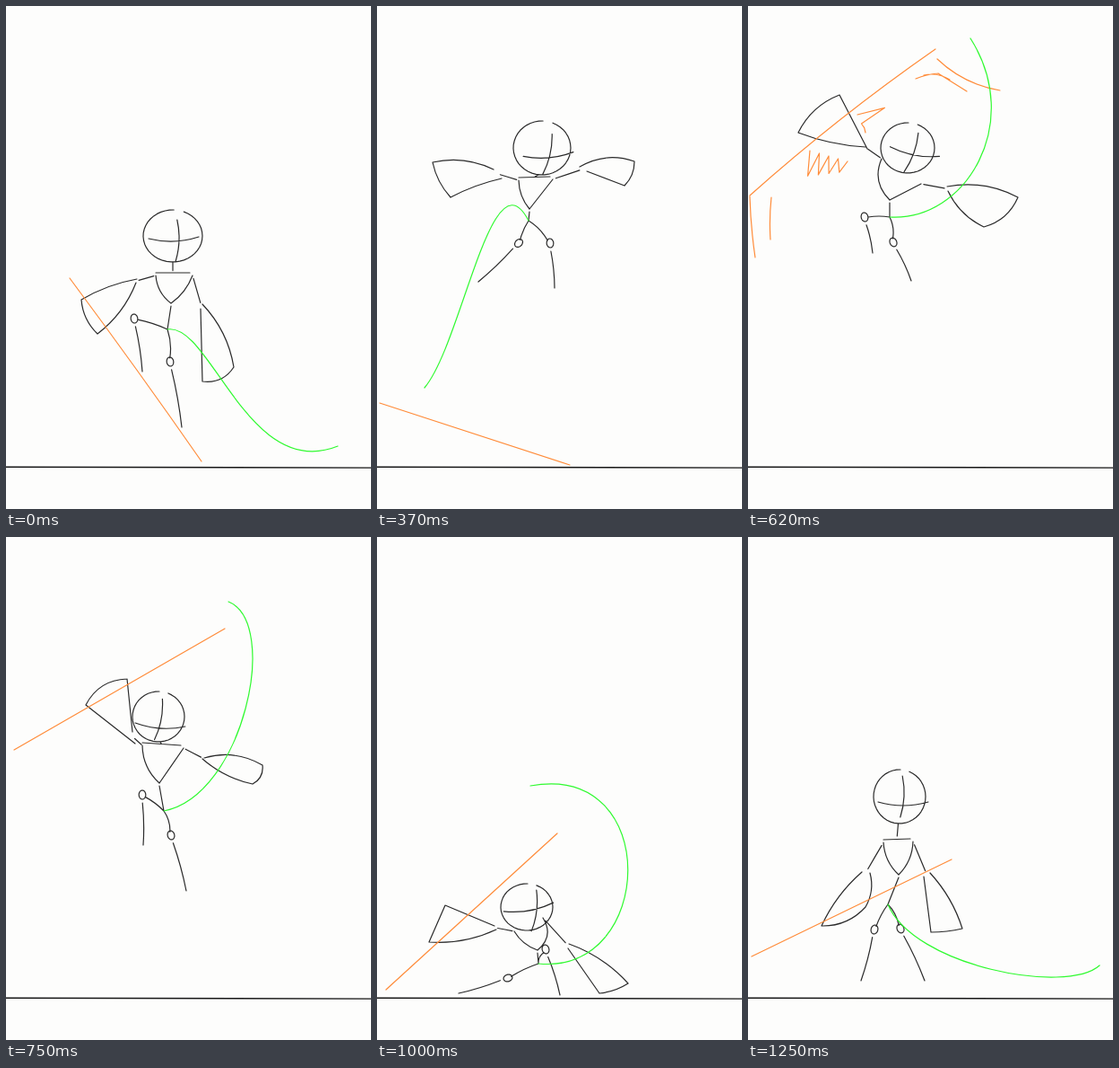
An HTML page for the animation above (1500 ms loop, 407x560 px).

```html
<!DOCTYPE html>
<html lang="en">
<head>
<meta charset="utf-8">
<title>Staff leap</title>
<style>
  html, body { margin: 0; width: 100%; height: 100%; overflow: hidden; background: #fdfdfc; }
  svg { display: block; width: 100vw; height: 100vh; }
  path { fill: none; stroke-width: 1.2; stroke-linecap: round; stroke-linejoin: round; }
  #body { stroke: #2a2a2a; }
  #staff { stroke: #ff8c3a; }
  #tail { stroke: #30fa30; }
  #ground { stroke: #161616; stroke-width: 1.4; }
</style>
</head>
<body>
<svg viewBox="0 0 407 560">
  <path id="ground" d="M0 513.2L407 514.1"/>
  <path id="body"/>
  <path id="staff"/>
  <path id="tail"/>
</svg>
<script>
// head: centre, radii. face: eye line offset and angle, nose line offset and angle.
// chest: left shoulder, right shoulder, base, bend of each side.
// arms: upper and lower start of the sleeve, two cuff corners, three bends.
// legs: left knee, left foot, right knee, right foot.
// staff: ends and bend. tail: Bezier handles and tip, seen from the hip.
const ready = {
  head: [186, 256, 33, 29], face: [1, 2, -2, 4, 5, 92],
  chest: [167, 300, 208, 300, 184, 331, 4, 3], hip: [180, 360],
  armL: [146, 304, 145, 308, 84, 327, 102, 365, -3, 5, -4],
  armR: [219, 332, 217, 337, 254, 402, 219, 418, 6, 0, 6],
  legs: [143, 348, 152, 407, 183, 396, 196, 469],
  staff: [71, 303, 218, 507, 1], tail: [48, -8, 90, 170, 190, 130]
};
const crouch = {
  head: [188, 283, 31, 29], face: [0, 7, -2, 11, 2, 92],
  chest: [165, 310, 198, 308, 184, 344, 7, 5], hip: [183, 361],
  armL: [124, 317, 133, 322, 82, 372, 117, 404, -5, 5, -2],
  armR: [232, 313, 237, 330, 318, 310, 313, 351, 0, 0, 6],
  legs: [143, 357, 136, 413, 187, 401, 180, 459],
  staff: [58, 333, 224, 517, 0], tail: [79, -46, 97, 149, 150, 147]
};
const leap = {
  head: [184, 158, 32, 30], face: [7, 7, -5, 6, 7, 103],
  chest: [158, 194, 196, 193, 170, 226, 3, 0], hip: [169, 239],
  armL: [130, 182, 139, 192, 62, 174, 82, 213, -6, -2, -3],
  armR: [226, 179, 234, 184, 287, 173, 276, 200, 7, 0, 3],
  legs: [158, 264, 113, 307, 193, 264, 198, 314],
  staff: [3, 442, 215, 511, 0], tail: [-41, -79, -74, 136, -116, 186]
};
const strike = {
  head: [178, 158, 30, 28], face: [8, 4, 11, 4, 5, 110],
  chest: [149, 170, 193, 198, 158, 216, 8, 0], hip: [158, 235],
  armL: [133, 159, 131, 157, 102, 99, 56, 141, 0, 3, -6],
  armR: [222, 201, 223, 206, 301, 213, 263, 246, 7, -5, 6],
  legs: [130, 235, 139, 275, 162, 263, 182, 306],
  staff: [2, 211, 209, 48, 4], tail: [85, 5, 150, -105, 90, -199]
};
const drop = {
  head: [170, 200, 29, 28], face: [2, 9, 4, 0, 3, 101],
  chest: [152, 232, 198, 235, 171, 274, 5, 0], hip: [176, 305],
  armL: [141, 217, 144, 230, 135, 158, 89, 187, 0, 0, -8],
  armR: [221, 246, 219, 247, 286, 254, 275, 275, 7, -4, 4],
  legs: [152, 287, 153, 343, 184, 332, 201, 394],
  staff: [9, 237, 244, 102, 0], tail: [89, -17, 130, -210, 72, -233]
};
const land = {
  head: [167, 412, 29, 26], face: [2, 0, -10, 8, 4, 97],
  chest: [153, 439, 185, 424, 179, 460, 3, 8], hip: [180, 475],
  armL: [131, 433, 133, 437, 76, 410, 58, 451, 0, 5, 0],
  armR: [214, 453, 213, 458, 280, 497, 248, 508, 5, 0, 2],
  legs: [146, 491, 91, 508, 188, 459, 204, 510],
  staff: [10, 504, 201, 330, 0], tail: [130, 13, 139, -225, -9, -198]
};
const rise = {
  head: [169, 289, 29, 30], face: [4, 6, 0, 2, 0, 93],
  chest: [151, 340, 184, 339, 168, 376, 4, 4], hip: [156, 409],
  armL: [127, 373, 136, 374, 82, 433, 131, 412, -4, 4, -6],
  armR: [203, 374, 196, 378, 239, 436, 204, 440, 4, 0, 1],
  legs: [141, 437, 126, 494, 170, 436, 197, 494],
  staff: [4, 467, 227, 359, 0], tail: [29, 69, 199, 101, 236, 68]
};

const lerp = (a, b, u) => a.map((v, i) => v + (b[i] - v) * u);
const pairs = list => list.flatMap((x, i) => i % 2 ? [] : [[x, list[i + 1]]]);
const xy = p => p.map(v => v.toFixed(1)).join(' ');
const line = pts => 'M' + pts.map(xy).join('L');

// Pen stroke from a to b, bulging by `bend` to the left of its direction.
function bow(a, b, bend = 0) {
  const dx = b[0] - a[0], dy = b[1] - a[1], k = 2 * bend / (Math.hypot(dx, dy) || 1);
  const [mx, my] = lerp(a, b, 0.5);
  return 'M' + xy(a) + 'Q' + xy([mx + dy * k, my - dx * k]) + ' ' + xy(b);
}

// Straight part of a to b, with gaps left at both ends.
function gapped(a, b, head, tail = 0) {
  const d = Math.hypot(b[0] - a[0], b[1] - a[1]) || 1;
  return [lerp(a, b, head / d), lerp(a, b, 1 - tail / d)];
}

function ring(cx, cy, rx, ry, tilt = 0, from = 0, sweep = 360) {
  const rad = Math.PI / 180, c = Math.cos(tilt), s = Math.sin(tilt);
  return line(Array.from({ length: 41 }, (_, i) => {
    const a = (from + sweep * i / 40) * rad, x = rx * Math.cos(a), y = ry * Math.sin(a);
    return [cx + x * c - y * s, cy + x * s + y * c];
  }));
}

function tick(cx, cy, half, deg, bend) {
  const x = half * Math.cos(deg * Math.PI / 180), y = half * Math.sin(deg * Math.PI / 180);
  return bow([cx - x, cy - y], [cx + x, cy + y], bend);
}

function zigzag(a, b, teeth, first, last) {
  const dx = b[0] - a[0], dy = b[1] - a[1], d = Math.hypot(dx, dy);
  return line(Array.from({ length: teeth * 2 + 1 }, (_, i) => {
    const u = i / (teeth * 2), [x, y] = lerp(a, b, u);
    const depth = i % 2 ? (first + (last - first) * u) / d : 0;
    return [x + dy * depth, y - dx * depth];
  }));
}

function drawHead({ head: [x, y, rx, ry], face: [ex, ey, tilt, nx, ny, lean] }) {
  return ring(x, y, rx, ry, 0, -68, 340) + tick(x + ex, y + ey, 28, tilt, -4) + tick(x + nx, y + ny, 23, lean, 3);
}

function drawChest({ head: [hx, hy, , ry], chest, hip }) {
  const [left, right, base] = pairs(chest), chin = hy + ry;
  let d = bow(left, base, -chest[6]) + bow(right, base, chest[7]) + bow([base[0], base[1] + 3], hip);
  // The collar and neck show once both shoulders are clear of the chin.
  if (Math.min(left[1], right[1]) > chin) {
    const a = [left[0], left[1] - 3], b = [right[0] - 3, right[1] - 3], mid = lerp(a, b, 0.5);
    const top = [(hx + mid[0]) / 2, chin];
    d += bow(a, b) + bow(top, lerp(top, mid, 0.8));
  }
  return d;
}

function drawArm(arm, shoulder) {
  const [upper, lower, cuffA, cuffB] = pairs(arm), [bu, bl, bc] = arm.slice(8);
  const elbow = lerp(upper, lower, 0.5);
  return bow(lerp(shoulder, elbow, 0.1), lerp(shoulder, elbow, 0.88)) +
    bow(upper, cuffA, bu) + bow(lower, cuffB, bl) + bow(cuffA, cuffB, bc);
}

function drawLeg(hip, knee, foot, bend) {
  const tilt = Math.atan2(foot[1] - knee[1], foot[0] - knee[0]);
  return bow(...gapped(hip, knee, 0, 4), bend) + ring(...knee, 5, 3.8, tilt) + bow(...gapped(knee, foot, 9), 1);
}

function drawTail({ hip, tail }) {
  return 'M' + xy(hip) + 'C' + pairs(tail).map(p => xy([hip[0] + p[0], hip[1] + p[1]])).join(' ');
}

function render(pose, extra = '') {
  const [kneeL, footL, kneeR, footR] = pairs(pose.legs);
  const [left, right] = pairs(pose.chest);
  const [a, b] = pairs(pose.staff);
  return {
    body: drawHead(pose) + drawChest(pose) + drawArm(pose.armL, left) + drawArm(pose.armR, right) +
      drawLeg(pose.hip, kneeL, footL, -1) + drawLeg(pose.hip, kneeR, footR, 2),
    staff: bow(a, b, pose.staff[4]) + extra,
    tail: drawTail(pose)
  };
}

// Joints move straight to the halfway pose; the tail swings around the hip.
function between(p, q) {
  const mid = {};
  for (const key in p) mid[key] = lerp(p[key], q[key], 0.5);
  const ends = pairs(q.tail);
  mid.tail = pairs(p.tail).flatMap(([x, y], i) => {
    const [u, v] = ends[i];
    const a = (Math.atan2(y, x) + Math.atan2(v, u)) / 2, r = (Math.hypot(x, y) + Math.hypot(u, v)) / 2;
    return [r * Math.cos(a), r * Math.sin(a)];
  });
  return mid;
}

const impact =
  bow([211, 59], [281, 94], -6) + bow([187, 81], [212, 75], 1) + bow([196, 77], [225, 82], 3) +
  bow([212, 75], [244, 95]) + bow([2, 212], [8, 280], -1) + bow([26, 213], [25, 260], -1) +
  zigzag([122, 121], [131, 141], 2, 46, -14) + zigzag([69, 161], [111, 173], 4, -30, -12);

const steps = [
  [0, render(ready)],
  [120, render(crouch)],
  [250, render(between(crouch, leap))],
  [370, render(leap)],
  [500, render(between(leap, strike))],
  [620, render(strike, impact)],
  [750, render(drop)],
  [870, render(between(drop, land))],
  [1000, render(land)],
  [1120, render(between(land, rise))],
  [1250, render(rise)]
];

const layers = ['body', 'staff', 'tail'].map(id => [id, document.getElementById(id)]);
const start = performance.now();
let shown;

function draw() {
  const t = (performance.now() - start) % 1500;
  const [, step] = steps.filter(([at]) => at <= t).pop();
  if (step !== shown) {
    for (const [id, el] of layers) el.setAttribute('d', step[id]);
    shown = step;
  }
  requestAnimationFrame(draw);
}
draw();
</script>
</body>
</html>
```
